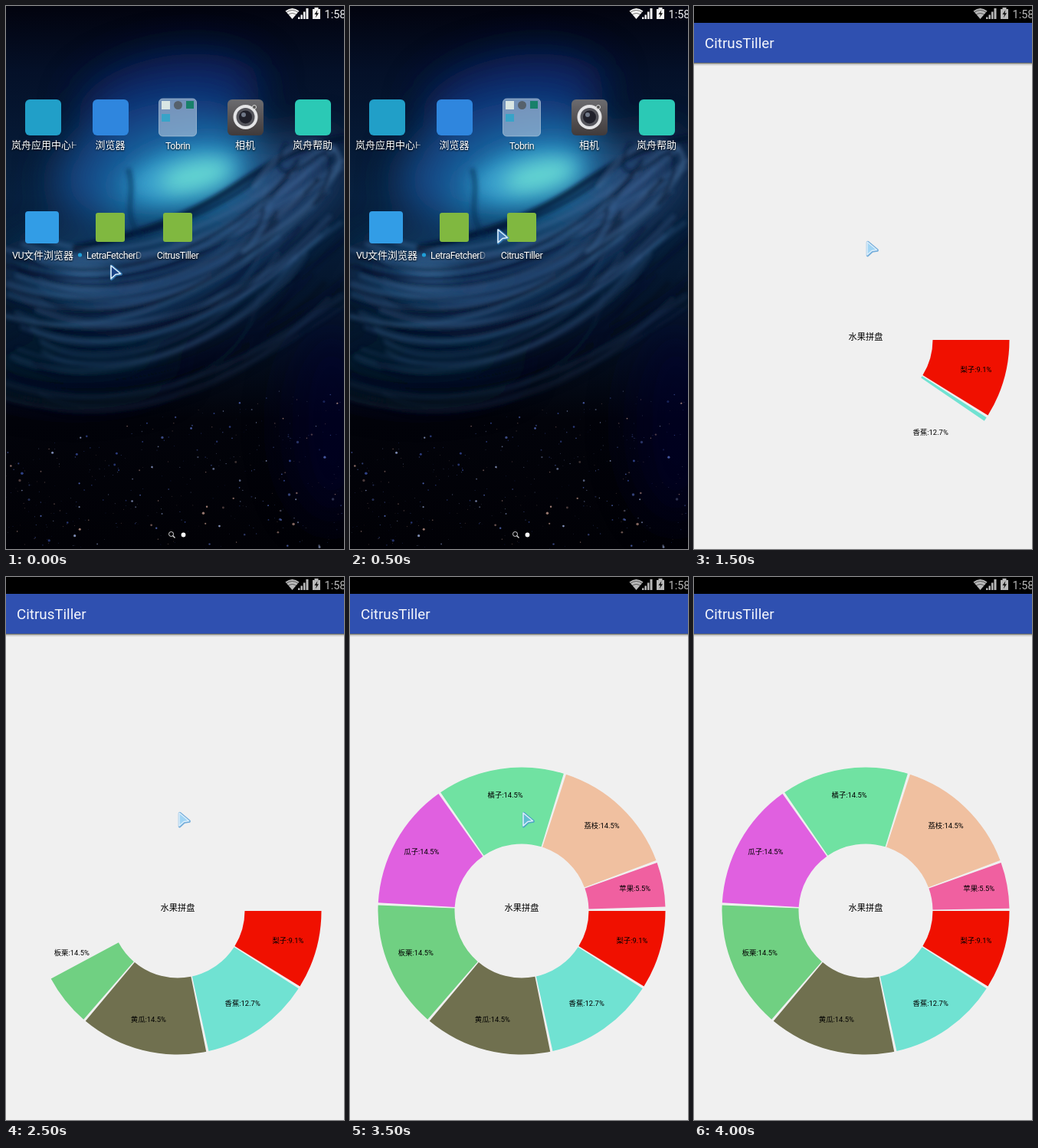
Animation of 441x709 px, one loop 4.5 s. Source, as an HTML page:

```html
<!DOCTYPE html>
<html lang="zh-CN">
<head>
<meta charset="utf-8">
<title>Ring chart demo</title>
<style>
  html, body { margin: 0; width: 100%; height: 100%; overflow: hidden; background: #000; }
  svg { display: block; width: 100%; height: 100%; }
  text { font-family: Roboto, "Noto Sans CJK SC", "Noto Sans CJK", sans-serif; }
  .label { font-size: 13px; fill: #fff; filter: drop-shadow(0 1px 1px #000); }
  .latin { font-size: 12.5px; letter-spacing: -.5px; }
  .mid, .slice { text-anchor: middle; }
  .slice { font-size: 9.4px; }
</style>
</head>
<body>
<svg viewBox="0 0 441 709" xmlns="http://www.w3.org/2000/svg">
  <defs>
    <filter id="soft" x="-20%" y="-20%" width="140%" height="140%"><feGaussianBlur stdDeviation="2.6"/></filter>
    <filter id="haze" x="-80%" y="-80%" width="260%" height="260%"><feGaussianBlur stdDeviation="26"/></filter>
    <filter id="glow" x="-80%" y="-80%" width="260%" height="260%"><feGaussianBlur stdDeviation="13"/></filter>
    <linearGradient id="sky" x2="0" y2="1">
      <stop offset="0" stop-color="#02030e"/>
      <stop offset=".12" stop-color="#041028"/>
      <stop offset=".35" stop-color="#07203e"/>
      <stop offset=".6" stop-color="#051226"/>
      <stop offset=".76" stop-color="#02030a"/>
      <stop offset="1" stop-color="#010106"/>
    </linearGradient>
    <linearGradient id="case" x2="0" y2="1">
      <stop offset="0" stop-color="#6c6c70"/>
      <stop offset="1" stop-color="#403a3a"/>
    </linearGradient>
    <linearGradient id="fade" x2="1">
      <stop offset=".86" stop-color="#fff"/>
      <stop offset="1" stop-color="#fff" stop-opacity=".2"/>
    </linearGradient>
    <clipPath id="cell1"><rect x="4" y="170" width="88" height="24"/></clipPath>
    <clipPath id="cell2"><rect x="102" y="314" width="76" height="24"/></clipPath>
  </defs>

  <g id="home">
    <rect width="441" height="709" fill="url(#sky)"/>
    <g filter="url(#haze)">
      <ellipse cx="215" cy="120" rx="120" ry="55" fill="#0a2a74" opacity=".85" transform="rotate(-10 215 120)"/>
      <ellipse cx="195" cy="205" rx="135" ry="75" fill="#155092" opacity=".9" transform="rotate(-16 195 205)"/>
      <ellipse cx="240" cy="225" rx="105" ry="48" fill="#2484bc" transform="rotate(-14 240 225)"/>
      <ellipse cx="360" cy="235" rx="85" ry="50" fill="#2a4c78" opacity=".85" transform="rotate(-35 360 235)"/>
      <ellipse cx="100" cy="350" rx="100" ry="48" fill="#1c4874" opacity=".8" transform="rotate(8 100 350)"/>
      <ellipse cx="250" cy="340" rx="150" ry="45" fill="#1b3f6c" opacity=".8" transform="rotate(-24 250 340)"/>
      <ellipse cx="90" cy="465" rx="130" ry="45" fill="#06203a" opacity=".6"/>
      <ellipse cx="425" cy="545" rx="60" ry="130" fill="#06082e" opacity=".55"/>
    </g>
    <g filter="url(#glow)">
      <ellipse cx="235" cy="222" rx="72" ry="30" fill="#3aa2cc" transform="rotate(-12 235 222)"/>
      <ellipse cx="248" cy="222" rx="46" ry="17" fill="#66d8d2" transform="rotate(-14 248 222)"/>
      <ellipse cx="100" cy="353" rx="34" ry="10" fill="#4a80b2" opacity=".75"/>
    </g>
    <g id="arms" fill="none" stroke-linecap="round" filter="url(#soft)"></g>
    <g id="stars"></g>

    <rect x="25" y="122" width="47" height="47" rx="6" fill="#219fc8"/>
    <rect x="113" y="122" width="47" height="47" rx="6" fill="#2f86de"/>
    <rect x="199.500" y="121" width="49" height="49" rx="5" fill="#a9c2dc" fill-opacity=".65" stroke="#c0d2e2" stroke-opacity=".6"/>
    <rect x="203" y="124" width="11" height="11" fill="#d9e6e4"/>
    <circle cx="224.500" cy="129.500" r="5.500" fill="#56616c"/>
    <rect x="235" y="124" width="10" height="10" fill="#18806a"/>
    <rect x="203" y="141" width="11" height="10" fill="#38a3c8"/>
    <rect x="289" y="122" width="47" height="47" rx="6" fill="url(#case)"/>
    <circle cx="312.500" cy="145" r="16" fill="#e4e4e6"/>
    <circle cx="312.500" cy="145" r="12" fill="#55555c"/>
    <circle cx="312.500" cy="145" r="8.500" fill="#20202a"/>
    <circle cx="310" cy="142" r="3" fill="#707888"/>
    <circle cx="324" cy="132" r="2.500" fill="#555" stroke="#ddd"/>
    <rect x="377" y="122" width="47" height="47" rx="6" fill="#2bc9b5"/>
    <rect x="25" y="268" width="44" height="42" rx="4" fill="#329de6"/>
    <rect x="117" y="270" width="38" height="38" rx="3" fill="#80b840"/>
    <rect x="205" y="270" width="38" height="38" rx="3" fill="#80b840"/>

    <g class="label">
      <g clip-path="url(#cell1)"><text x="7" y="186" fill="url(#fade)">岚舟应用中心H</text></g>
      <text class="mid" x="136" y="186">浏览器</text>
      <text class="mid latin" x="224" y="187">Tobrin</text>
      <text class="mid" x="312" y="186">相机</text>
      <text class="mid" x="400" y="186">岚舟帮助</text>
      <text x="8" y="330"><tspan class="latin">VU</tspan>文件浏览器</text>
      <g clip-path="url(#cell2)"><text class="latin" x="105" y="330" fill="url(#fade)">LetraFetcherD</text></g>
      <text class="mid latin" x="224" y="330">CitrusTiller</text>
    </g>
    <circle cx="96.500" cy="325" r="2.600" fill="#209fd8"/>
    <circle cx="215.500" cy="689.500" r="3" fill="none" stroke="#ddd"/>
    <path d="M217.700 691.700L220.500 694.500" stroke="#ddd" stroke-width="1.300"/>
    <circle cx="231.500" cy="690.500" r="2.900" fill="#fff"/>
  </g>

  <g id="app">
    <rect width="441" height="709" fill="#f0f0f0"/>
    <rect width="441" height="22" fill="#000"/>
    <rect y="22" width="441" height="52" fill="#2f50b0"/>
    <rect y="74" width="441" height="1" fill="#70726c"/>
    <rect y="75" width="441" height="1" fill="#b4b4b2"/>
    <rect y="76" width="441" height="1" fill="#d0d0d0"/>
    <rect y="77" width="441" height="1" fill="#e2e2e2"/>
    <text x="14" y="55" font-size="18.800" fill="#f4f6fc">CitrusTiller</text>
    <g id="ring"></g>
    <text class="mid" x="224" y="436" font-size="11.200">水果拼盘</text>
  </g>

  <g id="status">
    <path d="M364.500 6.500Q373.500 -.5 382.500 6.500L373.500 17Z"/>
    <path d="M365.500 8.500Q373.500 2.500 381.500 8.500M368 11.500Q373.500 7.500 379 11.500" fill="none" stroke="#000" stroke-opacity=".55"/>
    <path d="M381 17V14.500H383.500V17ZM384.500 17V11.500H387V17ZM388 17V7.500H390.500V17ZM391.500 17V3H394.500V17Z"/>
    <path d="M400 4H402.500V2H407.500V4H410V17H400Z"/>
    <path d="M406.500 5L402.500 11H405L403.800 15.500L408 9.300H405.500Z" fill="#111"/>
    <text x="415.500" y="15.500" font-size="14.500">1:58</text>
  </g>

  <g id="cursor" stroke-linejoin="round">
    <path d="M3 3L15.500 13.500L9 14.500L3 20Z" fill="none" stroke="#3d8fd0" stroke-opacity=".7" stroke-width="3.600" transform="translate(.6 .5)"/>
    <path id="tip" d="M3 3L15.500 13.500L9 14.500L3 20Z" stroke="#dceefb" stroke-width="1.600"/>
  </g>
</svg>
<script>
const LOOP = 4500, CX = 224, CY = 436, OUTER = 187.5, INNER = 87.5, LABEL = 150, GAP = 1;
const $ = id => document.getElementById(id);

function add(parent, tag, attrs) {
  const el = document.createElementNS("http://www.w3.org/2000/svg", tag);
  for (const key in attrs) el.setAttribute(key, attrs[key]);
  return parent.appendChild(el);
}

let seed = 7;
function random() {
  seed = (seed * 16807) % 2147483647;
  return seed / 2147483647;
}

function arm(d, stroke, width, opacity) {
  add($("arms"), "path", { d, stroke, "stroke-width": width, opacity });
}

// Fine strands sweeping from lower left to upper right
for (let i = 0; i < 44; i++) {
  const y = 300 + i * 5 + random() * 8;
  const d = `M${-10 + random() * 60} ${y}C${120 + random() * 40} ${y + 50} ` +
    `${290 + random() * 30} ${y - 10} ${330 + random() * 120} ${y - 130 + random() * 20}`;
  const light = random() < .45;
  arm(d, light ? "#40699a" : "#020a1c", 2 + random() * 6, (light ? .4 : .5) * (1 - i / 60));
}

// Dark lanes and bright rims around the core
arm("M90 316C170 300 240 275 300 235S390 180 441 172", "#04122c", 9, .75);
arm("M160 300C230 290 320 245 372 185", "#05183a", 5, .7);
arm("M325 235C350 195 390 165 425 185S395 270 310 320", "#456c98", 6, .5);
arm("M365 180C345 215 360 230 400 200S430 250 360 300", "#071a36", 5, .6);
arm("M160 215C170 250 150 270 175 300", "#08224c", 7, .45);
arm("M0 405C120 440 260 390 400 262", "#3a6896", 5, .45);

const tints = ["#8c9cc8", "#5268b8", "#b08a80", "#344894"];
for (let i = 0; i < 380; i++) {
  const cx = random() * 441;
  add($("stars"), "circle", {
    cx,
    cy: 709 - (130 + .22 * cx) * random(),
    r: .4 + 1.4 * Math.pow(random(), 5),
    fill: tints[i % tints.length],
    opacity: .3 + .6 * random()
  });
}

const fruits = [
  ["梨子", 5, "#f01000"], ["香蕉", 7, "#70e2d2"], ["黄瓜", 8, "#70704f"], ["板栗", 8, "#70d082"],
  ["瓜子", 8, "#e060e0"], ["橘子", 8, "#70e2a2"], ["荔枝", 8, "#f0c0a0"], ["苹果", 3, "#f060a0"]
];
const total = fruits.reduce((sum, fruit) => sum + fruit[1], 0);

function polar(radius, degrees) {
  const a = degrees * Math.PI / 180;
  return [CX + radius * Math.cos(a), CY + radius * Math.sin(a)];
}

function sector(from, to) {
  return `M${polar(OUTER, from)}A${OUTER} ${OUTER} 0 0 1 ${polar(OUTER, to)}` +
    `L${polar(INNER, to)}A${INNER} ${INNER} 0 0 0 ${polar(INNER, from)}Z`;
}

let angle = 0;
const slices = fruits.map(([name, value, fill]) => {
  const start = angle, span = 360 * value / total;
  angle += span;
  const group = add($("ring"), "g", {});
  const path = add(group, "path", { fill });
  const [x, y] = polar(LABEL, start + span / 2);
  add(group, "text", { class: "slice", x, y }).textContent =
    `${name}:${(100 * value / total).toFixed(1)}%`;
  return { group, path, start, end: start + span - GAP };
});

function drawRing(progress) {
  const sweep = 180 * (1 - Math.cos(Math.PI * progress));
  for (const { group, path, start, end } of slices) {
    const shown = sweep > start;
    group.style.display = shown ? "" : "none";
    if (shown) path.setAttribute("d", sector(start, Math.min(sweep, end)));
  }
}

// The screen refreshes in hard steps; cursor is [x, y, fill]
const steps = [
  { at: 0, cursor: [134, 336, "#1c4486"] },
  { at: 500, cursor: [190, 289, "#3f78b4"] },
  { at: 1000, cursor: [223, 305, "#3f78a8"] },
  { at: 1500, cursor: [223, 305, "#a0d4f4"], progress: .2 },
  { at: 2500, cursor: [223, 305, "#a0d4f4"], progress: .45 },
  { at: 3000, cursor: [223, 305, "#62bcd2"], progress: .708 },
  { at: 3500, cursor: [223, 305, "#62bcd2"], progress: .956 },
  { at: 4000, progress: 1 }
];

let current;
function render(time) {
  const step = steps.filter(s => s.at <= time).pop();
  if (step === current) return;
  current = step;
  const { cursor, progress } = step, open = progress !== undefined;
  $("home").style.display = open ? "none" : "";
  $("app").style.display = open ? "" : "none";
  $("status").setAttribute("fill", open ? "#b8b8b8" : "#f4f4f4");
  $("cursor").style.display = cursor ? "" : "none";
  if (cursor) {
    $("cursor").setAttribute("transform", `translate(${cursor[0]} ${cursor[1]})`);
    $("tip").setAttribute("fill", cursor[2]);
  }
  if (open) drawRing(progress);
}

const begin = performance.now();
function tick() {
  render((performance.now() - begin) % LOOP);
  requestAnimationFrame(tick);
}
tick();
</script>
</body>
</html>
```
